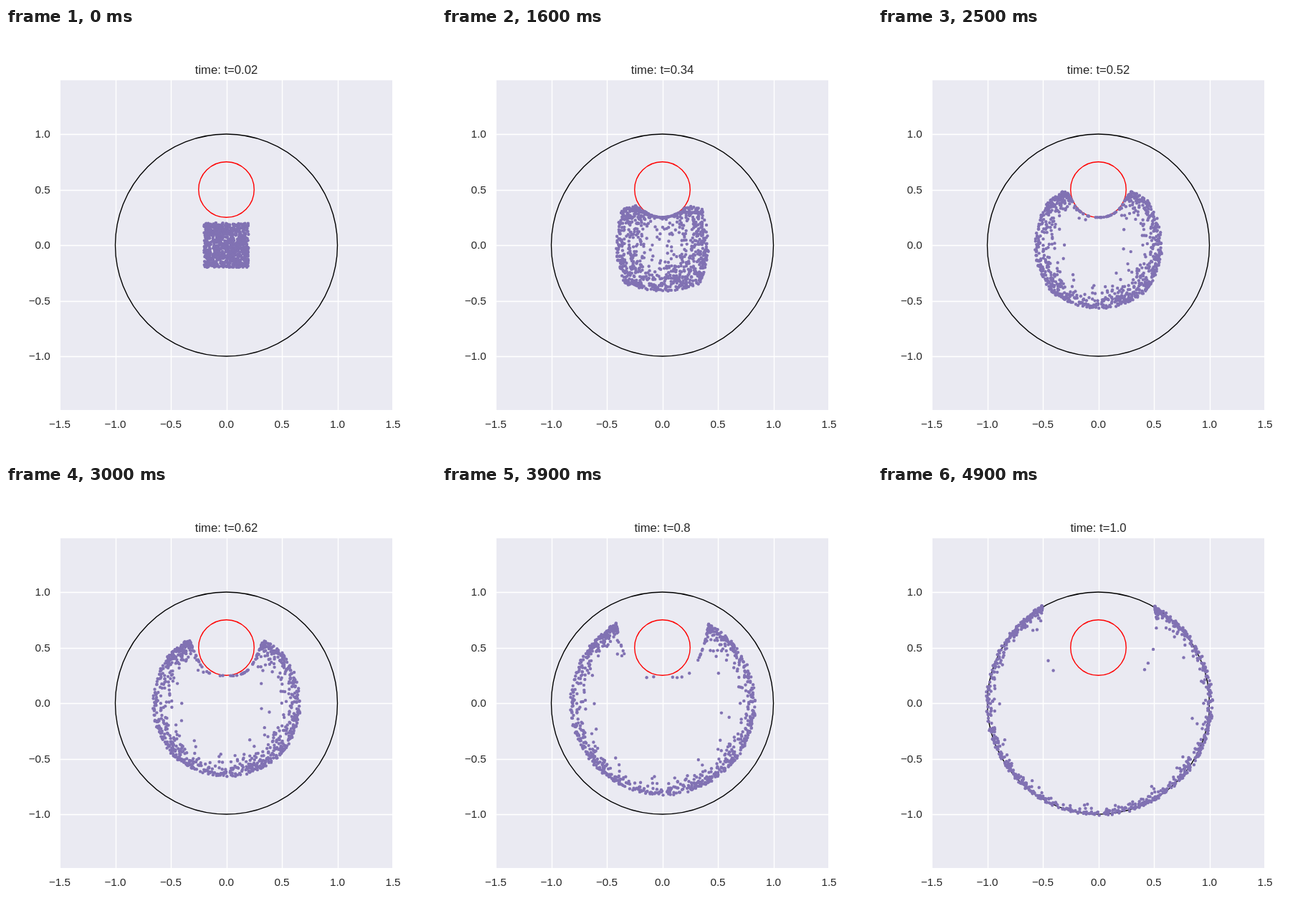
Recreate the animation shown at these times as an HTML page with a canvas. Size 600x600 px, loop 5 s.

```html
<!DOCTYPE html>
<html lang="en">
<head>
<meta charset="utf-8">
<title>Flow around an obstacle</title>
<style>
  html, body { margin: 0; width: 100%; height: 100%; overflow: hidden; background: #fff; }
  canvas { display: block; }
</style>
</head>
<body>
<canvas id="stage" width="600" height="600"></canvas>
<script>
const ctx = document.getElementById('stage').getContext('2d');
const TAU = Math.PI * 2, DEG = Math.PI / 180;
const LOOP = 5000, STEP = 100, COUNT = 900;
const CX = 307.5, CY = 303, UNIT = 155;
const LEFT = 75, TOP = 72, WIDTH = 465, HEIGHT = 462;
const OBSTACLE = { y: 0.5, r: 0.25 };
const BEND = 3.5;
const FONT = '"Liberation Sans", Arial, sans-serif';

// Flow parameters over time as [t, value] pairs
const EXTENT = [[.02, .2], [.14, .25], [.18, .277], [.26, .348], [.38, .45], [.5, .552], [.62, .661], [.74, .77], [.86, .884], [1, 1.005]];
const SQUARENESS = [[.02, 1], [.18, .88], [.34, .45], [.52, .13], [.7, 0]];
const SPREAD = [[.02, 1], [.18, 1.1], [.26, .8], [.34, .54], [.52, .22], [.7, .14], [.8, .105], [1, .042]];
const STALL = [[.02, 2], [.14, 10], [.26, 18], [.34, 14], [.52, 8], [.7, 4], [.8, 2.6], [1, 1.1]];
const STALL_RADIUS = [[.8, .25], [1, .5]];
const LAG = [[.42, 0], [.52, 3], [.7, 17], [.8, 24], [1, 48]];

function at(keys, t) {
  if (t <= keys[0][0]) return keys[0][1];
  for (let i = 1; i < keys.length; i++) {
    const [t0, v0] = keys[i - 1], [t1, v1] = keys[i];
    if (t <= t1) return v0 + (v1 - v0) * (t - t0) / (t1 - t0);
  }
  return keys[keys.length - 1][1];
}

function seeded(seed) {
  return () => {
    seed = (seed + 0x6D2B79F5) | 0;
    let n = Math.imul(seed ^ (seed >>> 15), 1 | seed);
    n = (n + Math.imul(n ^ (n >>> 7), 61 | n)) ^ n;
    return ((n ^ (n >>> 14)) >>> 0) / 4294967296;
  };
}

const random = seeded(20);
const particles = Array.from({ length: COUNT }, () => {
  const x = random() * 2 - 1, y = random() * 2 - 1;
  const u = Math.max(Math.abs(x), Math.abs(y));
  return { u, corner: Math.hypot(x, y) / u, angle: Math.atan2(x, y), jitter: random() - 0.5 };
});

// Smallest angle from the vertical that clears the obstacle at radius r
function clearAngle(r) {
  const { y, r: size } = OBSTACLE;
  const tangent = Math.sqrt(y * y - size * size);
  if (r <= y - size) return 0;
  if (r >= tangent) return Math.asin(size / y);
  return Math.acos((r * r + y * y - size * size) / (2 * r * y));
}

function flowAt(t) {
  const extent = at(EXTENT, t), square = at(SQUARENESS, t), spread = at(SPREAD, t);
  const stall = at(STALL, t) * DEG, hold = at(STALL_RADIUS, t), lag = at(LAG, t) * DEG;
  const ramp = Math.min(1, t / 0.18);
  return p => {
    const side = Math.sign(p.angle), a = Math.abs(p.angle);
    const edge = extent * Math.pow(p.corner, square);
    let r = edge * Math.pow(p.u, spread) + p.jitter * 0.02 * t * t;
    if (r > hold) r = hold + (r - hold) * (1 - Math.exp(-((a / stall) ** 2)));
    const min = ramp * clearAngle(r) + lag * Math.max(0, 1 - r / edge);
    const bent = side * Math.pow(a ** BEND + min ** BEND, 1 / BEND);
    const stretch = 1 + 0.018 * t * t * Math.max(0, Math.sin(bent));
    return [r * stretch * Math.sin(bent), r * Math.cos(bent)];
  };
}

function ring(y, r, color) {
  ctx.strokeStyle = color;
  ctx.lineWidth = 1.39;
  ctx.beginPath();
  ctx.arc(CX, CY - y * UNIT, r * UNIT, 0, TAU);
  ctx.stroke();
}

function label(text, x, y, size, align) {
  ctx.font = `${size}px ${FONT}`;
  ctx.textAlign = align;
  ctx.fillText(text, x, y);
}

const tick = v => v.toFixed(1).replace('-', '\u2212');

function drawAxes() {
  ctx.fillStyle = '#fff';
  ctx.fillRect(0, 0, 600, 600);
  ctx.fillStyle = '#eaeaf2';
  ctx.fillRect(LEFT, TOP, WIDTH, HEIGHT);
  ctx.strokeStyle = '#fff';
  ctx.lineWidth = 1.39;
  ctx.beginPath();
  for (let v = -1; v <= 1; v += 0.5) {
    const x = Math.round(CX + v * UNIT) + 0.5, y = Math.round(CY - v * UNIT) + 0.5;
    ctx.moveTo(x, TOP);
    ctx.lineTo(x, TOP + HEIGHT);
    ctx.moveTo(LEFT, y);
    ctx.lineTo(LEFT + WIDTH, y);
  }
  ctx.stroke();
  ctx.lineWidth = 2;
  ctx.strokeRect(LEFT, TOP, WIDTH, HEIGHT);

  ctx.fillStyle = '#262626';
  for (let v = -1.5; v <= 1.5; v += 0.5) {
    label(tick(v), CX + v * UNIT, 558, 15.28, 'center');
    if (Math.abs(v) < 1.5) label(tick(v), 61.8, Math.round(CY - v * UNIT) + 5, 15.28, 'right');
  }
}

function draw(t) {
  drawAxes();
  label('time: t=' + t.toFixed(2).replace(/0$/, ''), CX, 64, 16.67, 'center');
  ring(0, 1, '#000');
  ring(OBSTACLE.y, OBSTACLE.r, '#f00');

  const place = flowAt(t);
  ctx.fillStyle = '#8172b3';
  for (const p of particles) {
    const [x, y] = place(p);
    ctx.beginPath();
    ctx.arc(CX + x * UNIT, CY - y * UNIT, 2.2, 0, TAU);
    ctx.fill();
  }
}

const start = performance.now();
let shown = -1;
function tickFrame() {
  const step = Math.floor(((performance.now() - start) % LOOP) / STEP);
  if (step !== shown) {
    shown = step;
    draw((step + 1) * 0.02);
  }
  requestAnimationFrame(tickFrame);
}
tickFrame();
</script>
</body>
</html>
```
